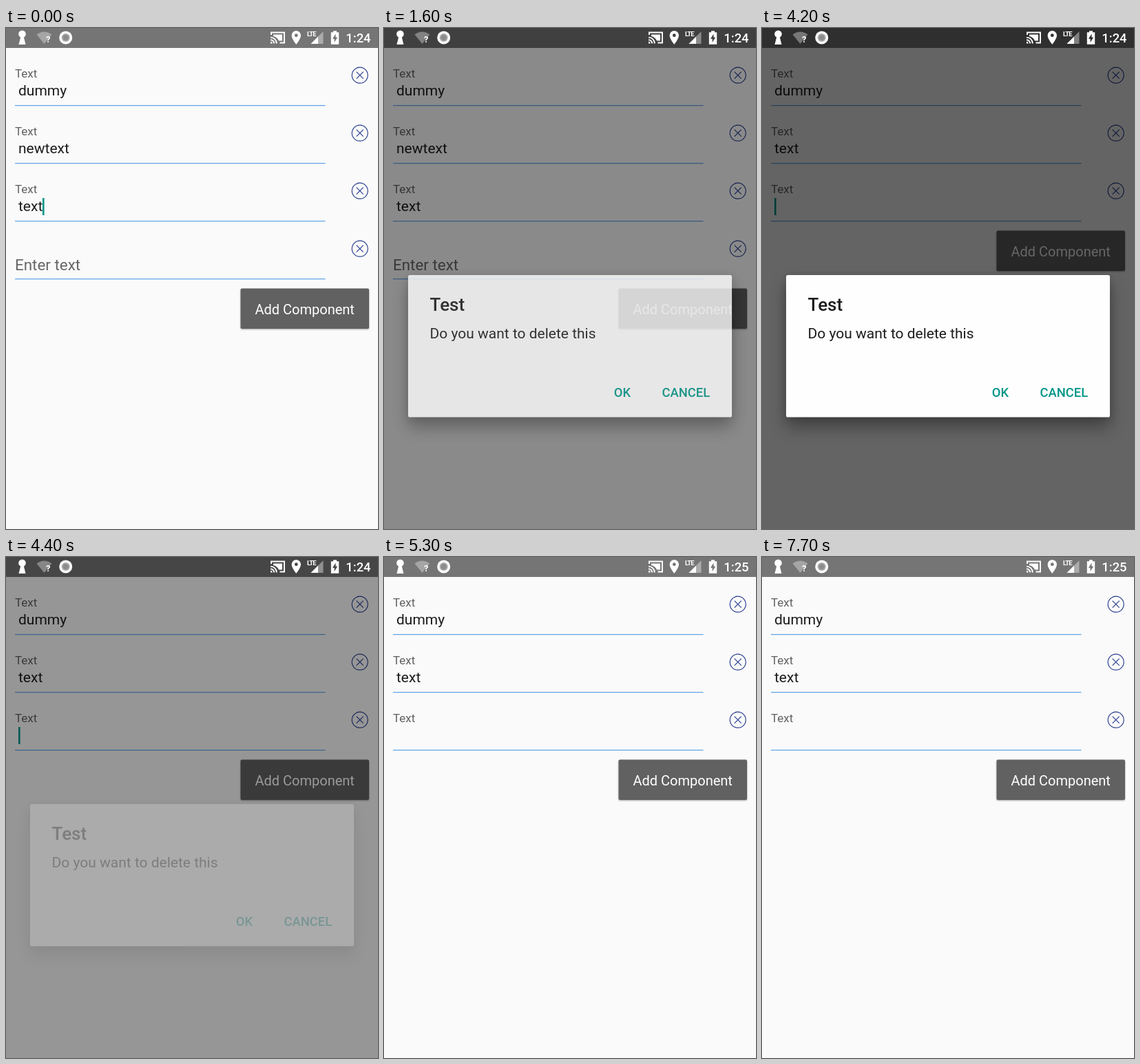
Write an HTML page that moves like this. It is 540 px wide and 728 px high and loops after 8 s.

```html
<!DOCTYPE html>
<html lang="en">
<head>
<meta charset="utf-8">
<title>Delete a text field</title>
<style>
  html, body { margin: 0; width: 100%; height: 100%; overflow: hidden; background: #fafafa; }
  svg { display: block; width: 540px; height: 728px; }
  text { font-family: Roboto, "Noto Sans", sans-serif; fill: #1c1c1c; font-size: 21px; }
  .label { font-size: 17px; fill: #616161; }
  .hint { font-size: 22.4px; fill: #666; }
  .caption { font-size: 20px; fill: #fff; }
  .title { font-size: 26px; font-weight: 500; }
  .action { font-size: 18.4px; font-weight: 500; fill: #009688; }
  .clock { font-size: 18.4px; font-weight: 500; fill: #fff; }
  .small { font-size: 12px; font-weight: 700; fill: #fff; }
  .caret { fill: #009688; }
  .button rect { fill: #616161; filter: drop-shadow(0 1px 1.2px rgba(0,0,0,.35)); }
  .dialog rect { fill: #fefefe; filter: drop-shadow(0 14px 12px rgba(0,0,0,.32)) drop-shadow(0 2px 6px rgba(0,0,0,.16)); }

  /* Everything changes in hard steps on one 8 s clock. */
  .before, .after, .pressed, .caret, .dim, .dialog, .early, .late {
    animation: 8s step-end infinite;
  }
  .before { animation-name: before; }
  .after { animation-name: after; }
  .pressed { animation-name: pressed; }
  .before .caret { animation-name: caret-before; }
  .after .caret { animation-name: caret-after; }
  .dim { animation-name: dim; }
  .dialog { animation-name: dialog; }
  .early { animation-name: early; }
  .late { animation-name: late; }

  @keyframes before { 0% { opacity: 1 } 52.5%, 100% { opacity: 0 } }
  @keyframes after { 0% { opacity: 0 } 52.5%, 100% { opacity: 1 } }
  @keyframes pressed { 0% { opacity: 1 } 13.75% { opacity: .25 } 18.75%, 100% { opacity: 1 } }
  @keyframes caret-before {
    0% { opacity: 1 } 5% { opacity: 0 } 11.25% { opacity: 1 } 18.75%, 100% { opacity: 0 }
  }
  @keyframes caret-after {
    0% { opacity: 1 } 60% { opacity: 0 } 67.5% { opacity: 1 } 71.25% { opacity: 0 }
    77.5% { opacity: 1 } 83.75% { opacity: 0 } 90% { opacity: 1 } 96.25%, 100% { opacity: 0 }
  }
  @keyframes dim {
    0% { opacity: 0 } 18.75% { opacity: .2 } 20% { opacity: .45 } 21.25% { opacity: .6 }
    53.75% { opacity: .55 } 55% { opacity: .4 } 56.25% { opacity: .21 } 57.5%, 100% { opacity: 0 }
  }
  @keyframes dialog {
    0% { opacity: 0 } 18.75% { opacity: .3 } 20% { opacity: .8 } 21.25% { opacity: 1 }
    53.75% { opacity: .75 } 55% { opacity: .2 } 56.25%, 100% { opacity: 0 }
  }
  @keyframes early { 0% { opacity: 1 } 60%, 100% { opacity: 0 } }
  @keyframes late { 0% { opacity: 0 } 60%, 100% { opacity: 1 } }
</style>
</head>
<body>
<svg viewBox="0 0 540 728">
  <defs>
    <path id="line" d="M13 112.6H463.500" stroke="#64a4e8" stroke-width="1.4"/>
    <g id="close" fill="none" stroke="#2a3f8f" stroke-width="1.2">
      <circle cx="513.700" cy="68.700" r="11.500"/>
      <path d="M508.700 63.700l10 10m0-10l-10 10"/>
    </g>
    <g id="button" class="button">
      <rect x="340.500" y="378.500" width="186.500" height="58.500" rx="2"/>
      <text class="caption" x="361.500" y="416">Add Component</text>
    </g>
  </defs>

  <rect width="540" height="728" fill="#fafafa"/>
  <rect width="540" height="29" fill="#757575"/>

  <!-- Shared first row -->
  <text class="label" x="13" y="71.500">Text</text>
  <text x="18" y="98">dummy</text>
  <use href="#line"/>
  <use href="#close"/>

  <!-- Rows two and three share labels and lines -->
  <text class="label" x="13" y="155.500">Text</text>
  <text class="label" x="13" y="239.500">Text</text>
  <use href="#line" y="84"/>
  <use href="#line" y="168"/>
  <use href="#close" y="84" class="pressed"/>
  <use href="#close" y="168"/>

  <g class="before">
    <text x="18" y="182">newtext</text>
    <text x="18" y="266">text</text>
    <rect class="caret" x="53" y="247" width="2.600" height="25"/>
    <text class="hint" x="13" y="351.500">Enter text</text>
    <use href="#line" y="252"/>
    <use href="#close" y="252"/>
    <use href="#button"/>
  </g>

  <g class="after">
    <text x="18" y="182">text</text>
    <rect class="caret" x="18" y="247" width="2.600" height="25"/>
    <use href="#button" y="-84"/>
  </g>

  <rect class="dim" width="540" height="728"/>

  <g class="dialog">
    <rect x="35" y="359" width="470" height="206.500" rx="2.600"/>
    <text class="title" x="66.500" y="411">Test</text>
    <text x="66.500" y="451">Do you want to delete this</text>
    <text class="action" x="333.700" y="535.500">OK</text>
    <text class="action" x="403.500" y="535.500">CANCEL</text>
  </g>

  <!-- Status icons stay bright above the dimmed page -->
  <g fill="#fff">
    <circle cx="23.500" cy="8.700" r="5.300"/>
    <path d="M21.500 12h4l3 12h-10z"/>
    <path d="M44.500 9.500Q55.500 1.500 66.500 9.500L55.500 23z" opacity=".35"/>
    <text class="small" x="58" y="21" style="font-size:13px">?</text>
    <circle cx="86.700" cy="14" r="9.500"/>
    <circle cx="86.700" cy="14" r="6" fill="#aaa"/>
    <circle cx="86.700" cy="14" r="4" fill="#8c8c8c"/>

    <g fill="none" stroke="#fff" stroke-width="1.900">
      <path d="M385 10V6.500H404V21.500H397.500"/>
      <path d="M384 13.600a8.800 8.800 0 0 1 8.800 8.800M384 17.200a5.200 5.200 0 0 1 5.200 5.200"/>
    </g>
    <path d="M384 19.700a2.700 2.700 0 0 1 2.700 2.700H384z"/>
    <path d="M388 9.500H401V18.500H396Q393.500 13 388 12z"/>

    <path fill-rule="evenodd" d="M421.300 4a6.700 6.700 0 0 0-6.700 6.700c0 5 6.700 13 6.700 13s6.700-8 6.700-13a6.700 6.700 0 0 0-6.700-6.700zm0 4.300a2.400 2.400 0 1 1 0 4.800a2.400 2.400 0 1 1 0-4.800z"/>

    <text class="small" x="437" y="11.500" style="font-size:9.500px;letter-spacing:-.9px">LTE</text>
    <path d="M460.500 5V23H442.500z" opacity=".4"/>
    <path d="M453 12.500V23H442.500z"/>

    <path fill-rule="evenodd" d="M475 4.300h5v2h3.200v17.400H471.800V6.300H475zM478.500 8.500L473.900 15.800H476.600V21L481.200 13.400H478.500z"/>
    <text class="clock early" x="493.300" y="21">1:24</text>
    <text class="clock late" x="493.300" y="21">1:25</text>
  </g>
</svg>
</body>
</html>
```
